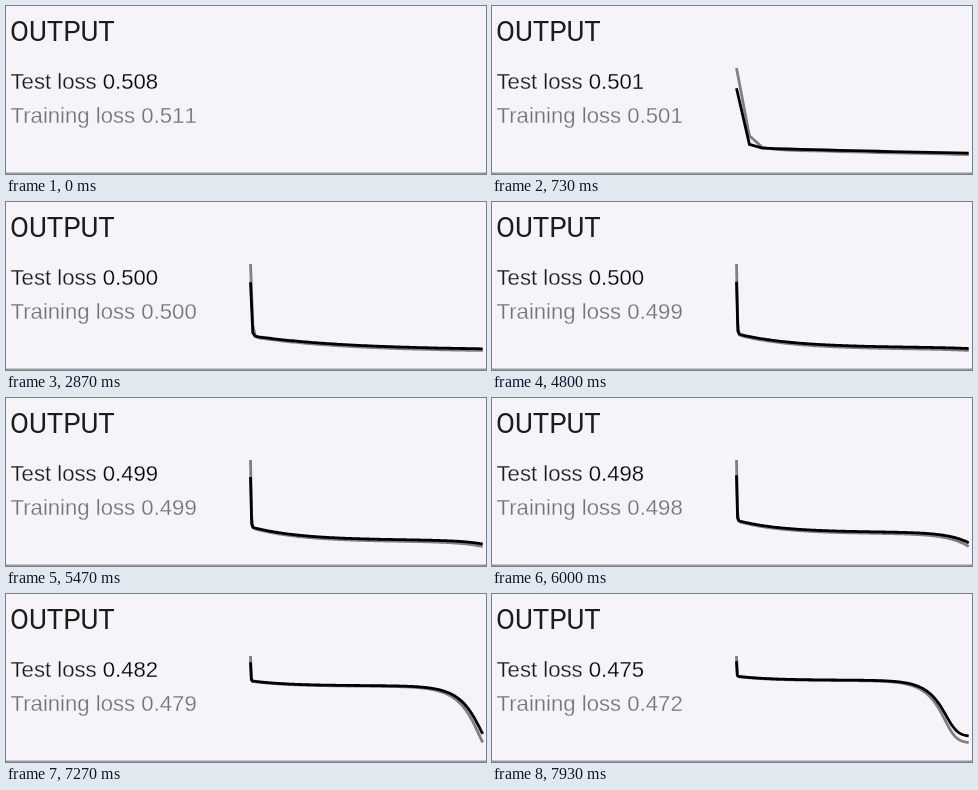
Recreate the animation shown at these times as an HTML page. Size 480x168 px, loop 8 s.

```html
<!DOCTYPE html>
<html lang="en">
<head>
<meta charset="utf-8">
<title>Loss chart</title>
<style>
  html, body { margin: 0; width: 100%; height: 100%; overflow: hidden; background: #f6f4f8; }
  svg { display: block; width: 480px; height: 168px; }
  .title { font: 400 27.5px Roboto, sans-serif; fill: #1c1c1c; }
  .loss {
    font: 22.15px "Liberation Sans", Arial, sans-serif;
    stroke: #f6f4f8; stroke-width: .3px; /* thins the strokes to a light weight */
  }
  .loss tspan { font-kerning: none; }
  .test { fill: #1c1c1c; }
  .test tspan { fill: #000; }
  .train { fill: #747474; }
  path { fill: none; stroke-width: 2.8; }
</style>
</head>
<body>
<svg viewBox="0 0 480 168">
  <rect y="166.5" width="480" height="1.5" fill="#999"/>
  <text class="title" x="4" y="35">OUTPUT</text>
  <text class="loss test" x="4.5" y="83">Test loss <tspan id="testValue"></tspan></text>
  <text class="loss train" x="4.5" y="117">Training loss <tspan id="trainValue"></tspan></text>
  <path id="trainLine" stroke="#808080"/>
  <path id="testLine" stroke="#000"/>
</svg>
<script>
const LOOP = 8000, FPS = 15, FIRST_TICK = 4, EPOCHS_PER_TICK = 2.57;
const LEFT = 244.5, RIGHT = 476.7, TOP = 62, BOTTOM = 148.5;

// A steep first drop, a slowly sinking plateau, then a skewed sigmoid fall
const lossCurve = ({ spike, rate, settle, plateau, fall, centre }) => n =>
  plateau + spike * Math.exp(-rate * n) + settle * Math.exp(-n / 42)
  - fall / Math.cbrt(1 + Math.exp(-.155 * (n - centre)));

const train = lossCurve({ spike: .0091, rate: 1.8, settle: .0019, plateau: .49963, fall: .0278, centre: 272.8 });
const test = lossCurve({ spike: .0067, rate: 2.8, settle: .0018, plateau: .49985, fall: .02514, centre: 274.4 });

const byId = id => document.getElementById(id);

function linePath(loss, count, min, max) {
  if (!count) return "";
  const points = Array.from({ length: count + 1 }, (_, n) => {
    const x = LEFT + (RIGHT - LEFT) * n / count;
    const y = TOP + (BOTTOM - TOP) * (max - loss(n)) / (max - min);
    return x.toFixed(2) + " " + y.toFixed(2);
  });
  return "M" + points.join("L");
}

function show(name, loss, epoch, min, max) {
  byId(name + "Value").textContent = loss(epoch).toFixed(3);
  byId(name + "Line").setAttribute("d", linePath(loss, epoch, min, max));
}

let shown = -1;
function draw(time) {
  const tick = Math.floor((time % LOOP + 4) * FPS / 1000);
  const epoch = Math.round(Math.max(0, tick - FIRST_TICK) * EPOCHS_PER_TICK);
  if (epoch === shown) return;
  shown = epoch;
  const max = train(0), min = Math.min(train(epoch), test(epoch));
  show("train", train, epoch, min, max);
  show("test", test, epoch, min, max);
}

const start = performance.now();
function frame() {
  draw(performance.now() - start);
  requestAnimationFrame(frame);
}
draw(0);
requestAnimationFrame(frame);
</script>
</body>
</html>
```
